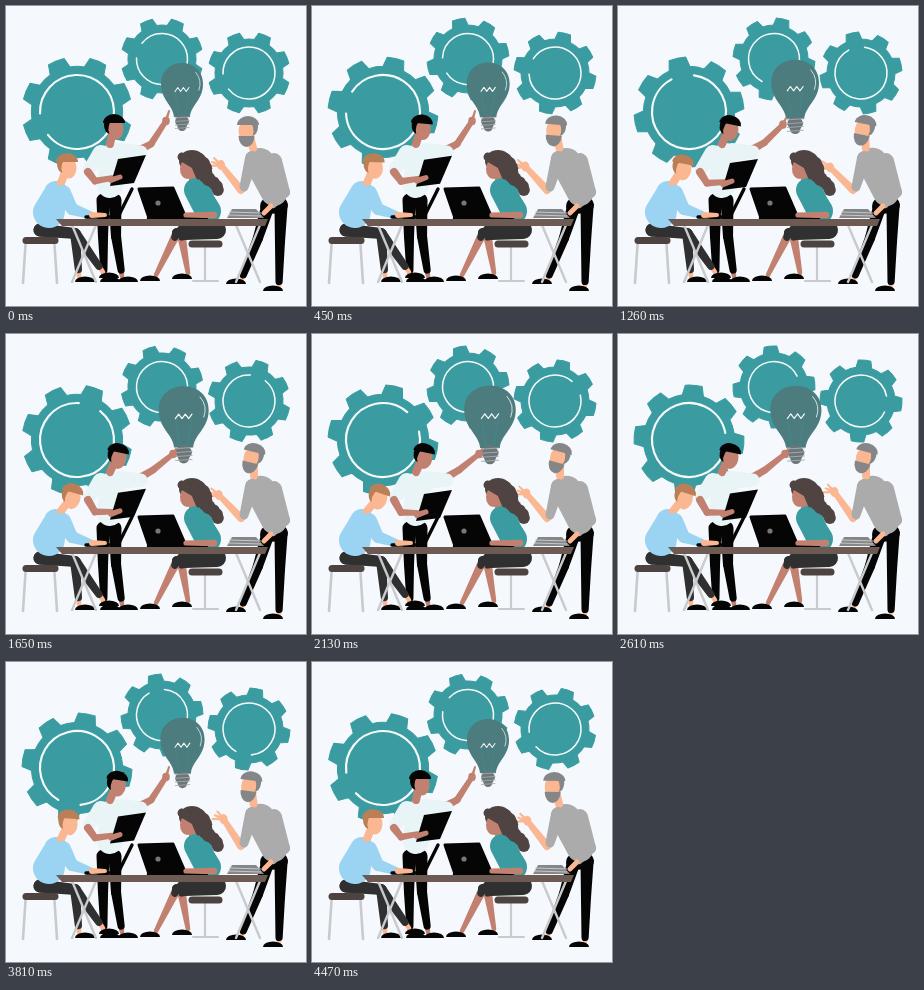
These frames come from a looping animation (300 by 300 pixels, 4.53 s). An HTML page with a canvas:

```html
<!DOCTYPE html>
<html lang="en">
<head>
<meta charset="utf-8">
<title>Team at work</title>
<style>
html, body { margin: 0; width: 100%; height: 100%; overflow: hidden; background: #f5f8fc; }
canvas { display: block; width: 300px; height: 300px; }
</style>
</head>
<body>
<canvas id="stage"></canvas>
<script>
const LOOP = 4530;
const { PI, sin, cos, min, max, sqrt, atan2 } = Math;
const TAU = PI * 2;
const canvas = document.getElementById('stage');
const ratio = window.devicePixelRatio || 1;
canvas.width = canvas.height = Math.round(300 * ratio);
const ctx = canvas.getContext('2d');
ctx.lineCap = ctx.lineJoin = 'round';

const C = {
  bg: '#f5f8fc', teal: '#3a9ca0', bulb: '#4d7c7f', socket: '#6c7577',
  black: '#050506', dark: '#303031', wood: '#6d5b53', seat: '#4d4442',
  shirt: '#e8f4f5', blue: '#9bd3f2', light: '#fbb791', brown: '#c28170',
  ginger: '#ba7f56', hair: '#4f4442', grey: '#ababac', silver: '#858687',
  metal: '#c9cacd', white: '#f6fafb'
};

const mix = (a, b, k) => a + (b - a) * k;
const between = (p, q, k) => [mix(p[0], q[0], k), mix(p[1], q[1], k)];
const smooth = k => { k = min(1, max(0, k)); return k * k * (3 - 2 * k); };

function fill(color) {
  ctx.fillStyle = color;
  ctx.fill();
}

function stroke(color, width) {
  ctx.strokeStyle = color;
  ctx.lineWidth = width;
  ctx.stroke();
}

function trace(points) {
  ctx.beginPath();
  points.forEach(p => ctx.lineTo(...p));
}

function poly(color, ...points) {
  trace(points);
  ctx.closePath();
  fill(color);
}

function line(color, width, ...points) {
  trace(points);
  stroke(color, width);
}

function oval(color, [x, y], rx, ry = rx, from = 0, to = TAU) {
  ctx.beginPath();
  ctx.ellipse(x, y, rx, ry, 0, from, to);
  fill(color);
}

// Rounded strip through the joints, its radius changing from r0 to r1.
function limb(color, r0, r1, ...joints) {
  const last = joints.length - 1;
  for (let i = 0; i < last; i++) {
    const [p, q] = [joints[i], joints[i + 1]];
    const a = atan2(q[1] - p[1], q[0] - p[0]);
    ctx.beginPath();
    ctx.arc(...p, mix(r0, r1, i / last), a + PI / 2, a - PI / 2);
    ctx.arc(...q, mix(r0, r1, (i + 1) / last), a - PI / 2, a + PI / 2);
    fill(color);
  }
}

function leg(cloth, skin, hip, knee, ankle, facing, cover = 0.85) {
  limb(skin, 4.5, 2.3, knee, ankle);
  limb(cloth, 6.5, 3.6, hip, knee, between(knee, ankle, cover));
  oval(C.black, [ankle[0] + facing * 6, ankle[1] + 6], 10, 5.5, PI, TAU);
}

function turned([x, y], angle, draw) {
  ctx.save();
  ctx.translate(x, y);
  ctx.rotate(angle);
  ctx.translate(-x, -y);
  draw();
  ctx.restore();
}

function head(neck, [x, y], facing, tilt, skin, hair, beard) {
  turned(neck, tilt, () => {
    limb(skin, 4, 4, neck, [x - facing * 2, y + 3]);
    oval(hair, [x - facing * 5, y - 3], 6, 9);
    oval(skin, [x + facing, y + 1], 7.5, 10.5);
    if (beard) oval(hair, [x + facing * 0.5, y + 6], 8, 11, 0, PI);
    oval(hair, [x - facing, y - 5], 11, 9, PI, TAU);
    oval(skin, [x - facing * 4.5, y + 2], 1.9, 2.6);
  });
}

function gear(x, y, r, ring, turn, direction) {
  const root = r * 0.83;
  const step = TAU / 8;
  ctx.save();
  ctx.translate(x, y);
  ctx.scale(1, direction);
  ctx.rotate(turn);
  ctx.beginPath();
  for (let a = step / 2; a < TAU; a += step) {
    ctx.arc(0, 0, r, a - 0.155, a + 0.155);
    ctx.arc(0, 0, root, a + 0.235, a + step - 0.235);
  }
  ctx.closePath();
  fill(C.teal);
  stroke(C.teal, 1);
  ctx.beginPath();
  ctx.arc(0, 0, ring, 3.1, 3.1 + TAU * 0.9);
  stroke(C.white, ring / 17);
  ctx.restore();
}

function bulb(swell) {
  ctx.save();
  ctx.translate(176 + swell * 2, 92);
  ctx.scale(1 + swell * 0.23, 1 + swell * 0.16);
  ctx.translate(-176, -92);
  ctx.beginPath();
  ctx.moveTo(168, 111);
  ctx.bezierCurveTo(167, 99, 155, 94, 155, 78);
  ctx.bezierCurveTo(155, 50, 197, 50, 197, 78);
  ctx.bezierCurveTo(197, 94, 185, 99, 184, 111);
  fill(C.bulb);
  line('#3f8a8e', 0.7, [173, 111], [169, 85]);
  line('#3f8a8e', 0.7, [179, 111], [183, 83]);
  const zigzag = Array.from({ length: 6 }, (_, i) => [169 + i * 2.8, 83.5 + (i % 2 ? -2 : 2)]);
  line(C.white, 1, ...zigzag);
  ctx.beginPath();
  ctx.arc(176, 78, 18, -0.7, 0.35);
  stroke('#dbe9ea', 0.8);
  limb(C.socket, 7, 4.5, [176, 116], [176, 120.5]);
  for (let y = 111; y < 122; y += 3.5) line('#a3adaf', 0.8, [169, y + 1], [183, y]);
  ctx.restore();
}

function standingMan(swing, turn) {
  leg(C.black, C.brown, [97, 194], [97, 230], [98, 270], 1);
  leg(C.black, C.brown, [109, 194], [110, 230], [116, 270], 1);

  const grip = smooth((swing - 0.3) / 0.45);
  const hand = between([160, 115], [167, 120], grip);
  const elbow = between([145, 138], [147, 136], grip);
  limb(C.brown, 4.2, 2.6, [130, 146], elbow, hand);
  oval(C.brown, hand, 3.8, 4.2);
  limb(C.brown, 1.4, 1, hand, [hand[0] + 3, hand[1] - mix(10, 5, grip)]);

  limb(C.shirt, 13, 13, [107, 150], [104, 179]);
  limb(C.shirt, 9, 6.5, [114, 146], [135, 146]);
  limb(C.shirt, 9, 6, [95, 148], [83, 163]);
  head([104, 138], [109, 122], 1, turn * 0.2, C.brown, C.black);

  // The clipboard and the hand under it sink together.
  const dip = swing * 7;
  limb(C.brown, 4, 2.8, [82, 166], [89, 175 + dip / 2], [106, 172 + dip]);
  poly(C.black, [112, 153 + dip], [140, 149 + dip], [128, 177 + dip], [104, 180 + dip]);
  limb(C.brown, 3, 2.5, [105, 174 + dip], [114, 171 + dip]);
}

function seatedMan(lean) {
  for (const foot of [17, 51]) line(C.metal, 2.6, [mix(34, foot, 0.85), 238], [foot, 277]);
  leg(C.dark, C.light, [34, 224], [69, 227], [73, 270], 1);
  leg(C.dark, C.light, [34, 224], [70, 228], [97, 266], 1);
  line(C.seat, 7, [20, 234.5], [49, 234.5]);
  limb(C.blue, 12, 16, [50, 187], [43, 206]);
  head([55, 177], [62, 161], 1, lean * 0.33, C.light, C.ginger);
  limb(C.blue, 8, 4, [57, 187], [66, 203], [84, 209]);
}

function woman() {
  line(C.metal, 2.2, [199, 240], [199, 275]);
  line(C.metal, 2.2, [187, 275], [212, 275]);
  line(C.seat, 7, [186, 238], [213, 238]);
  leg(C.dark, C.brown, [209, 225], [175, 227], [182, 267], -1, 0.1);
  leg(C.dark, C.brown, [209, 225], [171, 227], [150, 269], -1, 0.1);
  limb(C.dark, 8, 9, [178, 226], [211, 224]);
  limb(C.brown, 4, 4, [184, 166], [189, 177]);
  limb(C.teal, 12, 13, [190, 184], [202, 205]);

  oval(C.hair, [186, 155], 13, 11);
  for (let k = 0; k <= 1; k += 0.125) {
    oval(C.hair, [192 + 19 * k + 2 * sin(k * 9), 155 + 29 * k], 8.5 - 2.5 * k);
  }
  oval(C.brown, [181, 163], 7, 10);
  limb(C.hair, 4.5, 3.5, [176, 151], [189, 159], [193, 170]);
  limb(C.teal, 6, 5, [200, 186], [208, 205]);
}

function greyMan(lean, gesture) {
  leg(C.black, C.light, [261, 203], [252, 232], [236, 272], -1, 0.92);
  leg(C.black, C.light, [275, 201], [274, 235], [273, 279], -1, 0.92);
  limb(C.black, 8, 8, [262, 200], [274, 199]);

  turned([266, 195], lean * 0.02, () => {
    limb(C.grey, 15, 13, [254, 157], [268, 187]);
    head([247, 142], [241, 124], -1, lean * 0.24, C.light, C.silver, true);
  });

  // The forearm swings about the elbow.
  turned([235, 184], gesture * 0.12, () => {
    const palm = [215, 159];
    limb(C.light, 4, 2.8, [235, 184], palm);
    oval(C.light, palm, 4, 5);
    for (let i = 0; i < 3; i++) limb(C.light, 1.5, 1, palm, [204 + i * 2, 160 - i * 4]);
  });
  limb(C.grey, 7, 4.5, [246, 152], [238, 181]);
  limb(C.grey, 8, 4, [268, 155], [278, 186], [267, 198]);
  limb(C.light, 2.6, 2.4, [265, 200], [258, 207]);
}

function furniture() {
  for (const x of [66, 230]) {
    line(C.metal, 2.4, [x, 219], [x + 24, 276]);
    line(C.metal, 2.4, [x + 24, 219], [x, 276]);
  }
  line(C.black, 3.4, [80, 211], [112, 211], [126, 183]);
  const screen = [[133, 183], [167, 182], [180, 212], [143, 212]];
  poly(C.black, ...screen);
  line(C.black, 3, ...screen, screen[0]);
  line(C.black, 2.5, [142, 212], [201, 212]);
  oval('#777779', [152, 197], 2.6);
  poly(C.silver, [226, 203], [250, 203], [258, 212], [221, 212]);
  for (let y = 206; y < 212; y += 3) line('#d5d7d9', 0.8, [223, y], [255, y + 1]);
  poly(C.wood, [50, 213], [262, 213], [259, 220], [56, 220]);
  limb(C.light, 3, 2, [86, 209], [99, 209]);
  limb(C.brown, 3.3, 2.6, [208, 209], [180, 209]);
}

function render(t) {
  const phase = t / LOOP * TAU;
  const swing = (1 - cos(phase)) / 2;
  const lean = sqrt(swing);
  ctx.setTransform(ratio, 0, 0, ratio, 0, 0);
  ctx.fillStyle = C.bg;
  ctx.fillRect(0, 0, 300, 300);
  gear(71, 106, 55, 37, phase, 1);
  gear(156, 53, 41, 25.5, phase, -1);
  gear(243, 67, 41, 26, phase, 1);
  bulb(swing);
  standingMan(swing, 1 - (1 - swing) ** 6);
  greyMan(lean, sin(phase) * -1);
  seatedMan(swing);
  woman();
  furniture();
}

function tick() {
  render(performance.now() % LOOP);
  requestAnimationFrame(tick);
}
tick();
</script>
</body>
</html>
```
